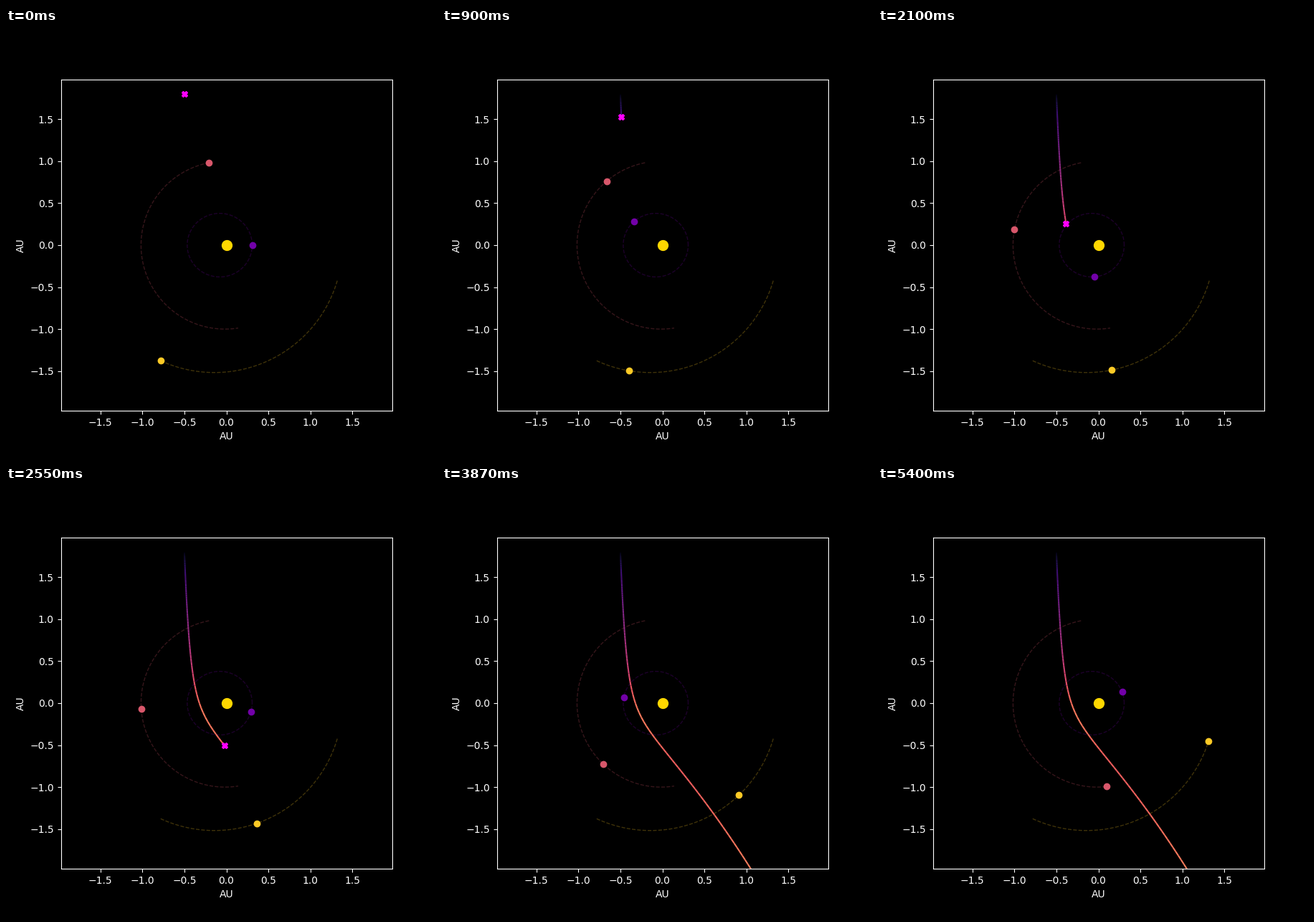
Recreate the animation shown at these times as a matplotlib script. Size 600x600 px, loop 5430 ms.

```python
import numpy as np
import matplotlib.pyplot as plt
from matplotlib.animation import FuncAnimation
from matplotlib.collections import LineCollection

DAYS = 181            # one frame per day
GM = 2.959e-4         # AU^3 / day^2
THRUST = np.array([0.0, -5e-4])
LIMIT = 1.972
PATH_DAYS = 182.6

# semi-major axis, eccentricity, period, mean anomaly at start, plasma level
PLANETS = [
    (0.387, 0.2056, 87.97, 0, 2 / 9),
    (1.000, 0.0167, 365.25, 100, 5 / 9),
    (1.524, 0.0934, 686.98, 250, 8 / 9),
]


def orbit(a, e, period, m0, t):
    """Position on a Kepler ellipse with the sun at the origin."""
    m = np.radians(m0) + 2 * np.pi * np.asarray(t) / period
    ecc = m
    for _ in range(12):
        ecc = ecc - (ecc - e * np.sin(ecc) - m) / (1 - e * np.cos(ecc))
    return a * (np.cos(ecc) - e), a * np.sqrt(1 - e * e) * np.sin(ecc)


def fly(days):
    """Probe falling past the sun under a constant downward thrust."""
    pos, vel = np.array([-0.5, 1.8]), np.zeros(2)
    track, speed = [pos], [0.0]
    for _ in range(days - 1):
        vel = vel - GM * pos / np.hypot(*pos) ** 3 + THRUST
        pos = pos + vel
        track.append(pos)
        speed.append(np.hypot(*vel))
    return np.array(track), np.array(speed)


plt.style.use("dark_background")
fig, ax = plt.subplots(figsize=(6, 6), dpi=100)
ax.set_aspect("equal")
ax.set_xlim(-LIMIT, LIMIT)
ax.set_ylim(-LIMIT, LIMIT)
ax.set_xlabel("AU")
ax.set_ylabel("AU")

ax.plot(0, 0, "o", color="gold", ms=10, zorder=3)

days = np.arange(DAYS)
movers = []
for a, e, period, m0, level in PLANETS:
    color = plt.cm.plasma(level)
    span = np.linspace(0, min(period, PATH_DAYS), 300)
    ax.plot(*orbit(a, e, period, m0, span), "--", color=color, lw=1, alpha=0.25)
    dot, = ax.plot([], [], "o", color=color, ms=6, zorder=4)
    movers.append((dot, np.column_stack(orbit(a, e, period, m0, days))))

track, speed = fly(DAYS)
segments = np.stack([track[:-1], track[1:]], axis=1)
trail = LineCollection([], cmap="magma", norm=plt.Normalize(0, 0.083), lw=1.5, zorder=2.5)
ax.add_collection(trail)
probe, = ax.plot([], [], "X", color="magenta", ms=6, zorder=5)
movers.append((probe, track))


def update(day):
    for marker, path in movers:
        marker.set_data(path[day:day + 1, 0], path[day:day + 1, 1])
    trail.set_segments(segments[:day])
    trail.set_array(speed[1:day + 1])
    return [marker for marker, _ in movers] + [trail]


anim = FuncAnimation(fig, update, frames=DAYS, interval=30, repeat=True, repeat_delay=0)
plt.show()
```
